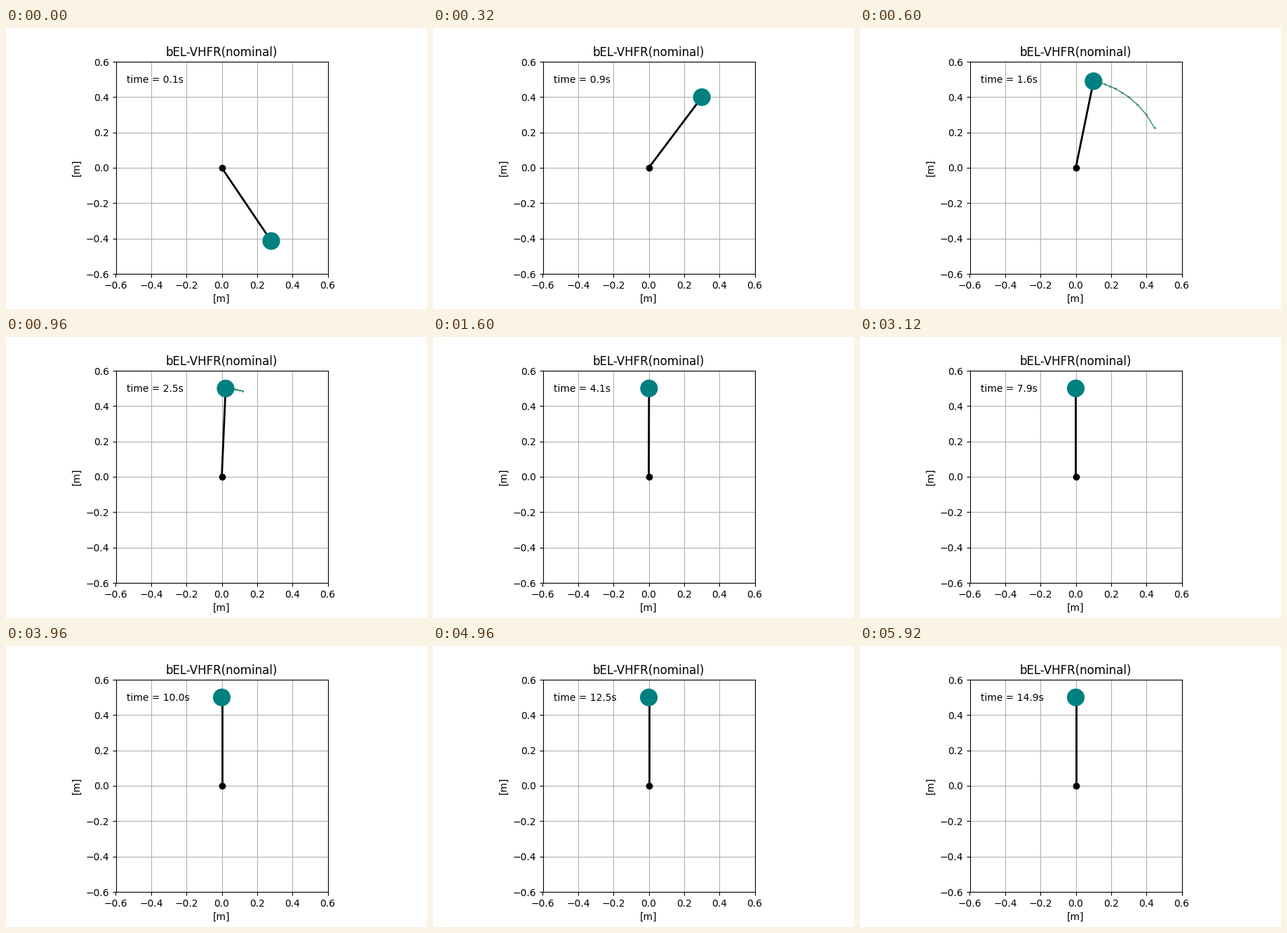
A matplotlib script that plays this animation: 600x400 px, repeating every 5.96 s.

```python
import numpy as np
import matplotlib.pyplot as plt
from matplotlib.animation import FuncAnimation

LENGTH = 0.5      # rod length in metres
DT = 0.1          # simulated seconds per frame
STEPS = 150
TRAIL = 10        # states kept in the trail

# Swing-up from hanging to upright: the angle from vertical decays
# almost exponentially, so it is interpolated on a log scale.
t = np.arange(STEPS) * DT
knots_t = [0, 0.1, 0.6, 0.9, 1.5, 2.5, 15]
knots_log = [np.log(a) for a in (np.pi, 2.547, 1.10, 0.645, 0.24, 0.0435)] + [-24.5]
theta = np.exp(np.interp(t, knots_t, knots_log))
x = LENGTH * np.sin(theta)
y = LENGTH * np.cos(theta)

plt.rcParams["font.family"] = "DejaVu Sans"
fig = plt.figure(figsize=(6, 4), dpi=100)
fig.subplots_adjust(left=0.125, right=0.9, bottom=0.125, top=0.88)
ax = fig.add_subplot(xlim=(-0.6, 0.6), ylim=(-0.6, 0.6), aspect="equal")
ax.grid()
ax.set(title="bEL-VHFR(nominal)", xlabel="[m]", ylabel="[m]")

rod, = ax.plot([], [], "o-", color="black", lw=2)
trail, = ax.plot([], [], ".-", color="seagreen", lw=1, ms=2)
bob = ax.add_patch(plt.Circle((x[1], y[1]), 0.05, fc="teal", zorder=3))
clock = ax.text(0.05, 0.9, "", transform=ax.transAxes)


def update(frame):
    k = frame + 1
    rod.set_data([0, x[k]], [0, y[k]])
    bob.center = x[k], y[k]
    # The trail only appears once it has its full length.
    past = slice(k - TRAIL, k + 1) if k >= TRAIL else slice(0)
    trail.set_data(x[past], y[past])
    clock.set_text(f"time = {k * DT:.1f}s")
    return rod, trail, bob, clock


anim = FuncAnimation(fig, update, frames=STEPS - 1, interval=40,
                     repeat=True, repeat_delay=0)
plt.show()
```
